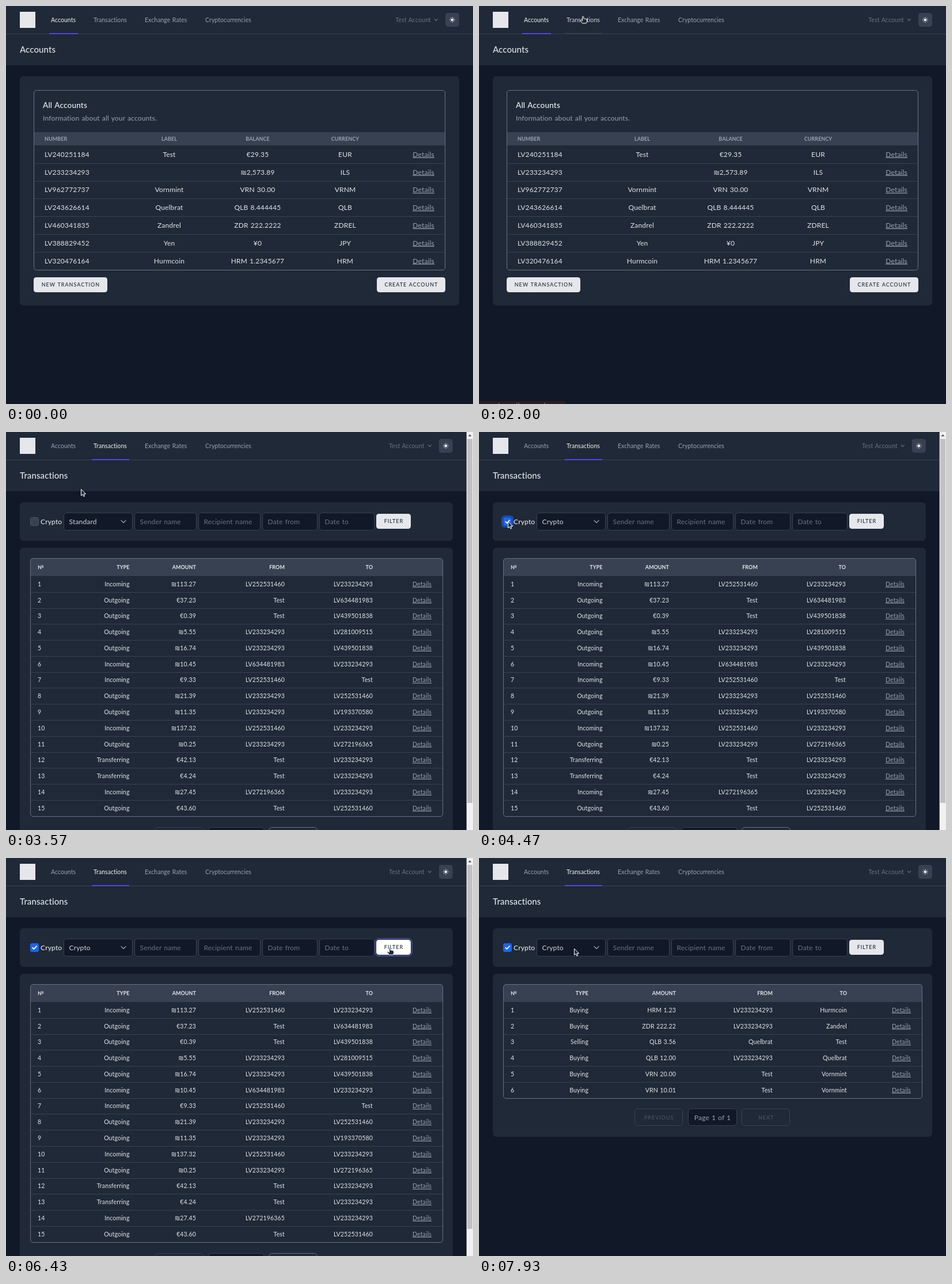
An HTML page that plays this animation: 811 by 691 pixels, repeating every 8 s.

```html
<!DOCTYPE html>
<html lang="en">
<head>
<meta charset="utf-8">
<title>Account transactions</title>
<style>
  html, body { margin: 0; width: 100%; height: 100%; overflow: hidden; background: #111827; }
  svg { position: absolute; left: 0; top: 0; display: block; }
  text { font-family: Lato, "Noto Sans", sans-serif; word-spacing: .06em; white-space: pre; }
</style>
</head>
<body>
<svg width="811" height="691" viewBox="0 0 811 691">
  <g id="page"></g>
  <g id="pointer">
    <path id="arrow" d="M.5 .5V11.5L3.1 9.2 4.8 13 6.7 12.2 5 8.5H8.6Z" fill="#1f2937" stroke="#fff"/>
    <path id="hand" d="M-1.5 6V.5Q-.5 -1 .7 .5V4Q2 3.2 2.7 4.4 4.2 3.6 4.8 4.9 6.5 4.5 6.5 6V9L5 12H-1.5L-5 7.5Q-5 5.5 -3 6.5L-1.5 8Z" fill="#1f2937" stroke="#fff"/>
  </g>
</svg>
<script>
const LOOP = 8000;
const INK = '#e5e7eb', MUTED = '#9ca3af', DIM = '#6b7280', EDGE = '#374151', PANEL = '#1f2937', BASE = '#111827';
const pageLayer = document.getElementById('page');
const pointer = document.getElementById('pointer');
const arrow = document.getElementById('arrow');
const hand = document.getElementById('hand');

const rect = (x, y, w, h, fill, r = 0, stroke = 'none') =>
  `<rect x="${x}" y="${y}" width="${w}" height="${h}" rx="${r}" fill="${fill}" stroke="${stroke}"/>`;
const line = (d, stroke, width = 1) =>
  `<path d="${d}" fill="none" stroke="${stroke}" stroke-width="${width}" stroke-linecap="round" stroke-linejoin="round"/>`;
const text = (x, y, s, size, fill = INK, { anchor = 'start', weight = 400, spacing = .015 * size, underline } = {}) =>
  `<text x="${x}" y="${y}" font-size="${size}" fill="${fill}" text-anchor="${anchor}" font-weight="${weight}"
    letter-spacing="${spacing}"${underline ? ' text-decoration="underline"' : ''}>${s}</text>`;
const details = (x, y, size) => text(x, y, 'Details', size, MUTED, { anchor: 'end', underline: true });
const caps = (x, y, s, fill, weight = 500) => text(x, y, s, 9, fill, { anchor: 'middle', weight, spacing: .98 });
const button = (x, y, w, s, weight, fill = INK) => rect(x, y, w, 26, fill, 4.5) + caps(x + w / 2 + .4, y + 16, s, PANEL, weight);
const chevron = (x, y, size, color, width) => line(`M${x - size} ${y - size / 2}l${size} ${size} ${size} ${-size}`, color, width);
const divider = (x, y, w) => rect(x, Math.round(y), w, 1, EDGE);

function sun(x) {
  let rays = '';
  for (let i = 0; i < 8; i++) {
    const c = Math.cos(i * Math.PI / 4), s = Math.sin(i * Math.PI / 4);
    rays += `M${x + 3.6 * c} ${24 + 3.6 * s}L${x + 4.4 * c} ${24 + 4.4 * s}`;
  }
  return rect(x - 12, 12, 24, 24, EDGE, 4.5) + `<circle cx="${x}" cy="24" r="2.3" fill="#fff"/>` + line(rays, '#fff');
}

const NAV = [['Accounts', 78, 50], ['Transactions', 152, 65], ['Exchange Rates', 241, 0], ['Cryptocurrencies', 346, 0]];

function frame(title, { width = 811, loading, hover }) {
  let out = rect(0, 0, 811, 691, BASE) + rect(0, 0, width, 103, PANEL) + rect(0, 48, width, 1, EDGE)
    + rect(24, 10, 27, 28, INK);
  for (const [label, x, w] of NAV) {
    const active = label === title, hovered = label === hover;
    out += text(x, 28, label, 10.5, active ? '#f3f4f6' : hovered ? '#d1d5db' : MUTED, { spacing: .05 });
    if (active || hovered) out += rect(x - 3, 47, w, 2, active ? '#4f46e5' : EDGE);
  }
  const user = loading ? width - 49 : width - 73;
  out += text(user, 27.5, 'Test Account', 10.5, DIM, { anchor: 'end' }) + chevron(user + 9, 24, 2.6, DIM, 1.2);
  if (!loading) out += sun(width - 36);
  return out + text(24, 81, title, 15, INK, loading ? { weight: 700, spacing: .4 } : { weight: 500, spacing: .1 });
}

const ACCOUNTS = [
  'LV240251184|Test|€29.35|EUR', 'LV233234293||₪2,573.89|ILS', 'LV962772737|Vornmint|VRN 30.00|VRNM',
  'LV243626614|Quelbrat|QLB 8.444445|QLB', 'LV460341835|Zandrel|ZDR 222.2222|ZDREL',
  'LV388829452|Yen|¥0|JPY', 'LV320476164|Hurmcoin|HRM 1.2345677|HRM'
];

function accountsPage(state) {
  const columns = [67, 283.5, 437, 589];
  const place = i => i ? 'middle' : 'start';
  let out = frame('Accounts', state) + rect(24, 122, 763, 398, PANEL, 6)
    + text(64, 176.5, 'All Accounts', 13.5, '#f3f4f6', { weight: 500 })
    + text(64, 198.5, 'Information about all your accounts.', 12, MUTED)
    + rect(49, 219, 713, 23, EDGE);
  ['NUMBER', 'LABEL', 'BALANCE', 'CURRENCY'].forEach((s, i) => {
    out += text(columns[i], 234, s, 9, MUTED, { anchor: place(i), weight: 700, spacing: .05 });
  });
  ACCOUNTS.forEach((row, r) => {
    const y = 261.7 + r * 30.8;
    row.split('|').forEach((s, i) => { out += text(columns[i], y, s, 12, INK, { anchor: place(i) }); });
    out += details(744, y, 12);
    if (r < 6) out += divider(49, y + 11, 713);
  });
  return out + rect(48.5, 146.5, 714, 312, 'none', 4.5, DIM)
    + button(48, 471, 128, 'NEW TRANSACTION') + button(644, 471, 119, 'CREATE ACCOUNT');
}

const OWN = 'LV233234293', SHOP = 'LV252531460';
const ALL_ROWS = [
  ['Incoming', '₪113.27', SHOP, OWN], ['Outgoing', '€37.23', 'Test', 'LV634481983'],
  ['Outgoing', '€0.39', 'Test', 'LV439501838'], ['Outgoing', '₪5.55', OWN, 'LV281009515'],
  ['Outgoing', '₪16.74', OWN, 'LV439501838'], ['Incoming', '₪10.45', 'LV634481983', OWN],
  ['Incoming', '€9.33', SHOP, 'Test'], ['Outgoing', '₪21.39', OWN, SHOP],
  ['Outgoing', '₪11.35', OWN, 'LV193370580'], ['Incoming', '₪137.32', SHOP, OWN],
  ['Outgoing', '₪0.25', OWN, 'LV272196365'], ['Transferring', '€42.13', 'Test', OWN],
  ['Transferring', '€4.24', 'Test', OWN], ['Incoming', '₪27.45', 'LV272196365', OWN],
  ['Outgoing', '€43.60', 'Test', SHOP]
];
const CRYPTO_ROWS = [
  ['Buying', 'HRM 1.23', OWN, 'Hurmcoin'], ['Buying', 'ZDR 222.22', OWN, 'Zandrel'],
  ['Selling', 'QLB 3.56', 'Quelbrat', 'Test'], ['Buying', 'QLB 12.00', OWN, 'Quelbrat'],
  ['Buying', 'VRN 20.00', 'Test', 'Vornmint'], ['Buying', 'VRN 10.01', 'Test', 'Vornmint']
];

function filterBar({ loading, checked, boxFocus, filterFocus, overFilter }) {
  const field = (x, w, s, color = DIM) => rect(x + .5, 140.5, w - 1, 30, BASE, 4.5, EDGE) + text(x + 9.5, 159.5, s, 12, color);
  let out = checked ? rect(42, 148, 15, 15, '#1c64f2', 3) + line('M46 155.7l2.4 2.4 4.7-4.9', '#fff', 1.8)
    : rect(42.5, 148.5, 14, 14, EDGE, 3, '#4b5563');
  if (boxFocus) out += `<rect x="40.2" y="146.2" width="18.6" height="18.6" rx="4.5" fill="none" stroke="#1c64f2" stroke-width="1.6"/>`;
  out += text(60, 159.5, 'Crypto', 12, '#f3f4f6');
  if (!loading) out += field(100, 120, checked ? 'Crypto' : 'Standard', '#d1d5db') + chevron(204, 155.5, 4, MUTED, 1.2);
  const shift = loading ? -123 : 0;
  out += field(223 + shift, 108, 'Sender name') + field(334 + shift, 108, 'Recipient name')
    + field(445 + shift, 96, 'Date from') + field(544 + shift, 96, 'Date to');
  if (filterFocus) out += rect(641, 140, 64, 30, PANEL, 6, '#6366f1');
  return out + button(643 + shift, 142, 60, 'FILTER', loading ? 900 : 500, overFilter ? '#fff' : INK);
}

function pagination(center, y, single) {
  const half = single ? 42 : 48;
  const x = center - half, box = (left, w, fill, stroke) => rect(left, y, w, 29, fill, 4.5, stroke);
  return box(x - 93, 83, 'none', EDGE) + caps(x - 51, y + 18, 'PREVIOUS', '#4b5563')
    + box(x, half * 2, BASE, EDGE) + text(center, y + 19.5, single ? 'Page 1 of 1' : 'Page 1 of 3', 12, MUTED, { anchor: 'middle' })
    + box(center + half + 9, 83, 'none', single ? EDGE : DIM)
    + caps(center + half + 51, y + 18, 'NEXT', single ? '#4b5563' : INK);
}

function scrollbar() {
  return rect(799.75, 0, 12, 691, '#f1f1f1') + rect(801, 12, 9, 632, '#c1c1c1')
    + '<path d="M802.5 7.5h6l-3-3.5z" fill="#505050"/>';
}

function transactionsPage(state) {
  const { filtered, loading } = state;
  const width = filtered ? 811 : 799.75, right = Math.round(width - 24);
  const rows = filtered ? CRYPTO_ROWS : ALL_ROWS;
  const columns = filtered ? [55, 190, 342, 510, 639] : [55, 214.5, 330, 484, 637];
  const tableWidth = right - 60, tableBottom = filtered ? 417 : 667;
  const place = i => i ? 'end' : 'start';
  let out = frame('Transactions', { ...state, width })
    + rect(24, 122, right - 24, 67, PANEL, 6) + filterBar(state)
    + rect(24, 201, right - 24, tableBottom - 134, PANEL, 6)
    + rect(42, 220, tableWidth, 30, EDGE, 4) + rect(42, 240, tableWidth, 10, EDGE);
  ['№', 'TYPE', 'AMOUNT', 'FROM', 'TO'].forEach((s, i) => {
    out += text(columns[i], 238.3, s, 9, INK, { anchor: place(i), weight: loading ? 900 : 700, spacing: .05 });
  });
  rows.forEach((row, r) => {
    const y = 267.8 + r * 27.78;
    [r + 1, ...row].forEach((s, i) => { out += text(columns[i], y, s, 10.5, INK, { anchor: place(i) }); });
    out += details(right - 37, y, 10.5);
    if (r < rows.length - 1) out += divider(43, y + 10, tableWidth);
  });
  out += rect(42.5, 219.5, tableWidth, tableBottom - 219, 'none', 4.5, DIM)
    + (filtered ? pagination(405.5, 435.5, true) : pagination(400, 686.5, false) + scrollbar());
  return out;
}

const statusBar = () => rect(-4, 686, 154, 12, '#2b1d22', 3) + text(4, 695.5, 'opens transactions overview', 9.5);

// Pointer waypoints: time, x, y of the tip.
const PATH = [
  [1640, 188, -14], [1950, 182, 16], [2150, 180, 24], [3050, 180, 24], [3270, 172, 38], [3570, 130, 99],
  [3850, 85, 140], [4070, 62, 154], [4250, 50, 155], [4700, 50, 155], [4930, 61, 156], [5370, 363, 205],
  [5770, 580, 186], [6000, 658, 159], [6200, 667, 156], [6720, 667, 156], [7030, 570, 197],
  [7300, 400, 207], [7600, 255, 185], [7900, 165, 157], [LOOP, 165, 157]
];

function pointerAt(t) {
  const i = PATH.findIndex(p => p[0] > t);
  if (i < 1) return null;
  const [t0, x0, y0] = PATH[i - 1], [t1, x1, y1] = PATH[i];
  const k = (t - t0) / (t1 - t0);
  return { x: x0 + (x1 - x0) * k, y: y0 + (y1 - y0) * k };
}

let shown = '';
function draw(now) {
  const t = now % LOOP;
  const tip = pointerAt(t);
  const overNav = !!tip && tip.y > 0 && tip.y < 48;
  const overFilter = !!tip && tip.x > 643 && tip.x < 703 && tip.y > 142 && tip.y < 168;
  const state = {
    accounts: t < 2470,
    loading: t >= 2470 && t < 2500 || t >= 6640 && t < 6670,
    filtered: t >= 6640,
    checked: t >= 4400,
    boxFocus: t >= 4400 && t < 6380,
    filterFocus: t >= 6380 && t < 6640,
    hover: overNav ? 'Transactions' : '',
    overFilter,
    status: overNav && t > 1800 && t < 3270
  };
  const key = JSON.stringify(state);
  if (key !== shown) {
    shown = key;
    pageLayer.innerHTML = (state.accounts ? accountsPage(state) : transactionsPage(state)) + (state.status ? statusBar() : '');
  }
  pointer.style.display = tip ? '' : 'none';
  if (tip) pointer.setAttribute('transform', `translate(${Math.round(tip.x)} ${Math.round(tip.y)})`);
  const pointing = overNav || overFilter;
  hand.style.display = pointing ? '' : 'none';
  arrow.style.display = pointing ? 'none' : '';
}

const start = performance.now();
function tick() {
  draw(performance.now() - start);
  requestAnimationFrame(tick);
}
tick();
</script>
</body>
</html>
```
